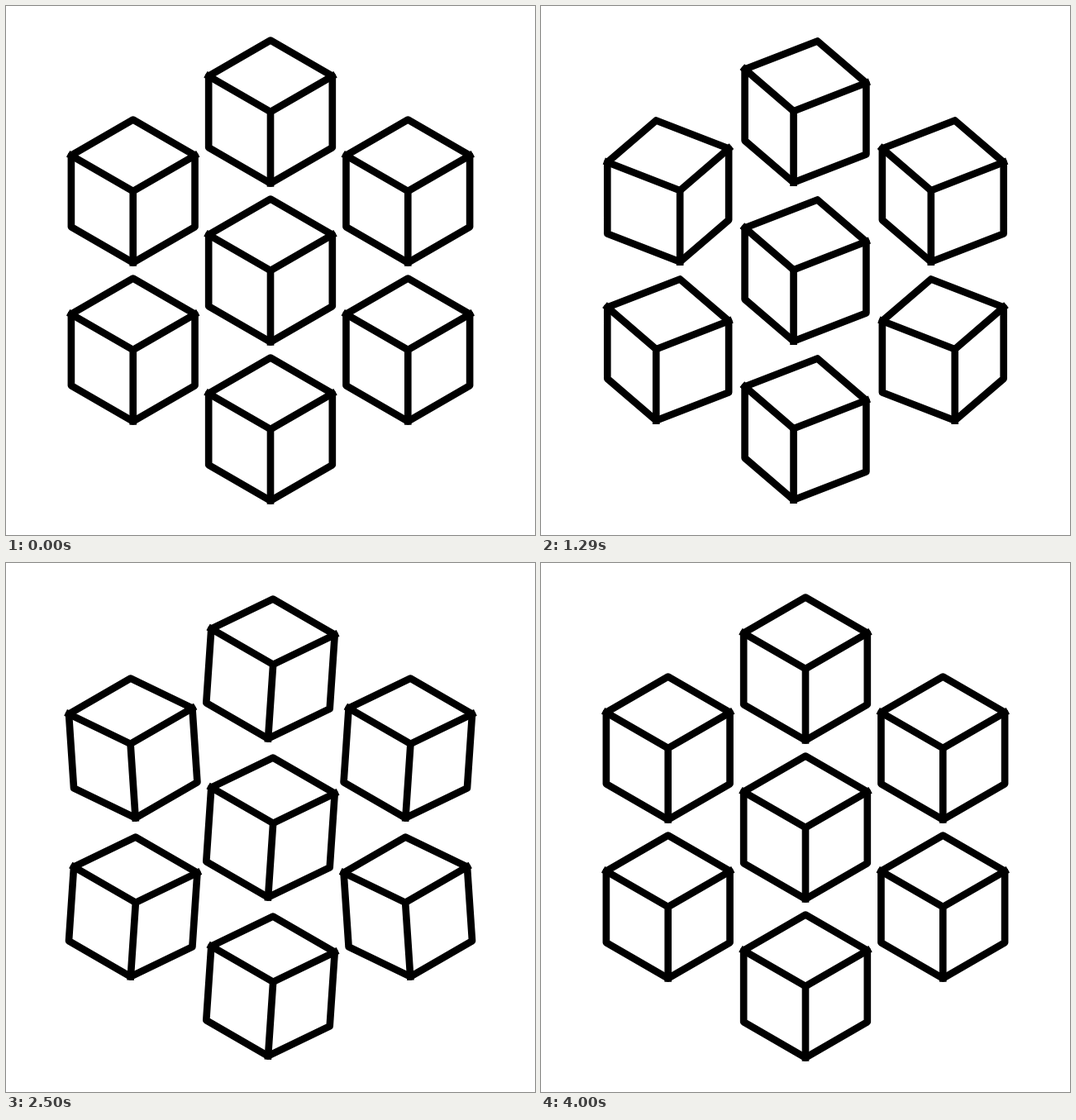
These frames come from a looping animation (640 by 640 pixels, 4.07 s). An HTML page with a canvas:

```html
<!DOCTYPE html>
<html lang="en">
<head>
<meta charset="utf-8">
<title>Turning cubes</title>
<style>
  html, body { margin: 0; width: 100%; height: 100%; overflow: hidden; background: #fff; }
  canvas { display: block; }
</style>
</head>
<body>
<canvas width="640" height="640"></canvas>
<script>
const ctx = document.querySelector('canvas').getContext('2d');
const LOOP = 4070, FPS = 14, TURN = 2;      // loop in ms, turn in seconds
const SPACING = 192, R = SPACING * 0.45;    // R: projected edge length at rest
const W = R * Math.sqrt(3) / 2, COLUMN = SPACING * Math.sqrt(3) / 2;

// Centre x, centre y, mirror direction
const cubes = [
  [0, -1, 1], [0, 0, 1], [0, 1, 1],
  [-1, -0.5, -1], [1, -0.5, 1], [-1, 0.5, 1], [1, 0.5, -1]
].map(([col, row, dir]) => [320 + col * COLUMN, 320 + row * SPACING, dir]);

const add = (...v) => v.reduce((a, b) => [a[0] + b[0], a[1] + b[1]]);
const scale = (v, k) => [v[0] * k, v[1] * k];

// Rotates two perpendicular edges in their common plane
function rotate(u, v, angle) {
  const c = Math.cos(angle), s = Math.sin(angle);
  return [add(scale(u, c), scale(v, s)), add(scale(v, c), scale(u, -s))];
}

// Cubic Bezier easing (0.775, 0, 0.2, 1), solved by bisection
function ease(x) {
  let lo = 0, hi = 1;
  for (let i = 0; i < 30; i++) {
    const s = (lo + hi) / 2, q = 1 - s;
    if (3 * 0.775 * s * q * q + 3 * 0.2 * s * s * q + s ** 3 < x) lo = s;
    else hi = s;
  }
  return lo * lo * (3 - 2 * lo);
}

function line(points, closed) {
  ctx.beginPath();
  points.forEach(p => ctx.lineTo(...p));
  if (closed) ctx.closePath();
  ctx.stroke();
}

function drawCube(right, left, down) {
  const front = scale(add(right, left, down), -0.5);
  const at = (...edges) => add(front, ...edges);
  line([at(right), at(right, left), at(left), at(left, down), at(down), at(right, down)], true);
  for (const edge of [right, left, down]) line([front, at(edge)]);
}

function draw(ms) {
  const time = Math.floor((ms % LOOP + 8) * FPS / 1000) / FPS % (2 * TURN);
  // A quarter turn looks like none, so past 45 degrees count from the far end
  let angle = ease(time % TURN / TURN) * Math.PI / 2;
  if (angle > Math.PI / 4) angle -= Math.PI / 2;

  let right = [W, -R / 2], left = [-W, -R / 2], down = [0, R];
  if (time < TURN) [right, left] = rotate(right, left, angle);
  else [right, down] = rotate(right, down, angle);

  ctx.clearRect(0, 0, 640, 640);
  ctx.lineWidth = R / 10;
  ctx.lineJoin = 'round';
  ctx.lineCap = 'square';
  for (const [x, y, dir] of cubes) {
    ctx.setTransform(dir, 0, 0, 1, x, y);
    drawCube(right, left, down);
  }
  ctx.resetTransform();
}

function tick() {
  draw(performance.now());
  requestAnimationFrame(tick);
}
tick();
</script>
</body>
</html>
```
